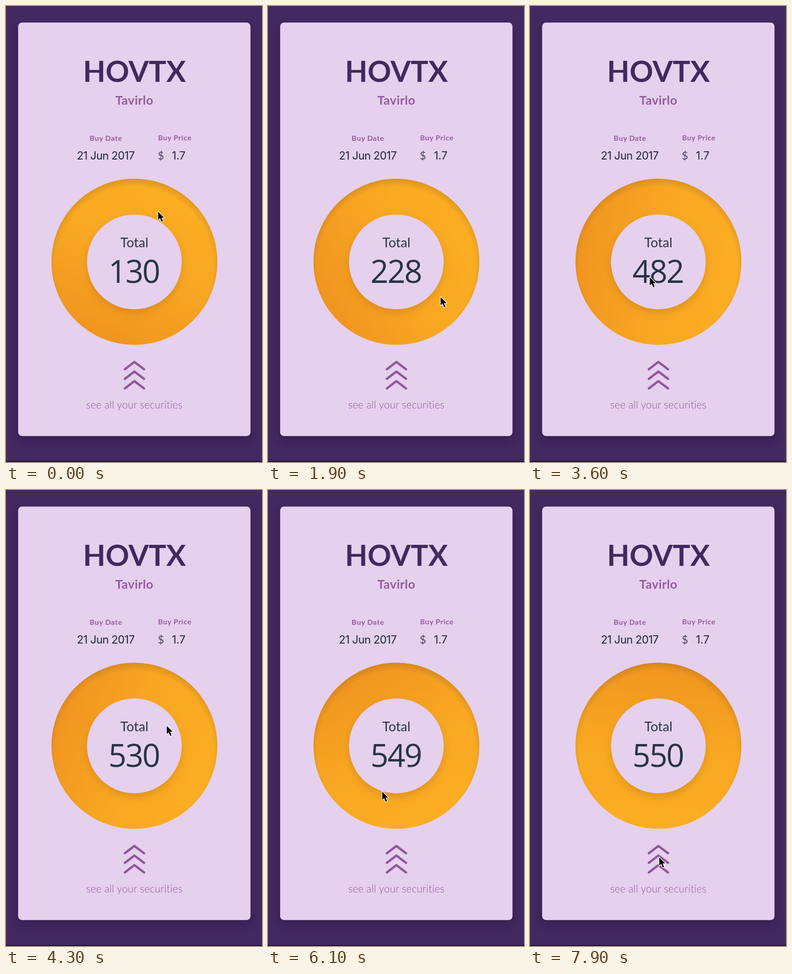
Recreate the animation shown at these times as an HTML page. Size 561 px wide and 998 px high, loop 8 s.

```html
<!DOCTYPE html>
<html lang="en">
<head>
<meta charset="utf-8">
<title>Security card</title>
<style>
  html, body { margin: 0; width: 100%; height: 100%; overflow: hidden; background: #42295f; }
  svg { display: block; width: 100%; height: 100%; }
  text { font-family: Lato, sans-serif; fill: #263449; }
  .mid { text-anchor: middle; }
  .ticker { font-size: 64px; font-weight: 700; fill: #42295f; }
  .fund { font-size: 27px; font-weight: 700; letter-spacing: .5px; fill: #955a9e; }
  .label { font-size: 16px; font-weight: 700; letter-spacing: .7px; fill: #955a9e; }
  .value { font-family: Inter, sans-serif; font-size: 24px; fill: #1c2740; }
  .date { letter-spacing: -.6px; }
  .dollar { font-size: 24px; fill: #4b4765; }
  .caption { font-size: 29px; }
  .total { font-family: "Open Sans", sans-serif; font-size: 69px; font-weight: 400; letter-spacing: -2.3px; }
  .hint { font-size: 22.5px; font-weight: 300; letter-spacing: .2px; fill: #91569b; }
  .chevrons { fill: none; stroke: #91569b; stroke-width: 5; stroke-linecap: round; stroke-linejoin: round; }
</style>
</head>
<body>
<svg viewBox="0 0 561 998">
  <defs>
    <linearGradient id="amber" gradientUnits="userSpaceOnUse" x1="281" y1="378" x2="281" y2="742">
      <stop offset="0" stop-color="#f09520"/>
      <stop offset=".5" stop-color="#f8a722"/>
      <stop offset="1" stop-color="#fbad22"/>
    </linearGradient>
    <radialGradient id="rim" gradientUnits="userSpaceOnUse" cx="281" cy="569" r="192">
      <stop offset=".9" stop-color="#8a5a1c" stop-opacity="0"/>
      <stop offset="1" stop-color="#8a5a1c" stop-opacity=".28"/>
    </radialGradient>
    <filter id="soft" x="-20%" y="-20%" width="140%" height="140%"><feGaussianBlur stdDeviation="9"/></filter>
    <clipPath id="disc"><circle cx="281.4" cy="559.8" r="182"/></clipPath>
  </defs>

  <rect width="561" height="998" fill="#42295f"/>
  <rect x="27" y="46" width="508" height="905" rx="8" fill="#21103b" opacity=".4" filter="url(#soft)"/>
  <rect y="996" width="561" height="2" fill="#1d112b"/>
  <rect x="26.6" y="36.3" width="509.2" height="905" rx="8.5" fill="#e5d0ee"/>

  <text class="mid ticker" x="281.5" y="166">HOVTX</text>
  <text class="mid fund" x="281.3" y="216">Tavirlo</text>
  <text class="mid label" x="219" y="295">Buy Date</text>
  <text class="mid label" x="370" y="294">Buy Price</text>
  <text class="mid value date" x="218.5" y="335.5">21 Jun 2017</text>
  <text class="dollar" x="332.5" y="335.5">$</text>
  <text class="value" x="363.5" y="335.5">1.7</text>

  <g clip-path="url(#disc)">
    <circle cx="281.4" cy="559.8" r="182" fill="url(#amber)"/>
    <circle cx="281.4" cy="559.8" r="182" fill="url(#rim)"/>
    <circle cx="281.4" cy="568" r="102" fill="#8a4f16" opacity=".28" filter="url(#soft)"/>
  </g>
  <circle cx="281.3" cy="560" r="103.8" fill="#e5d0ee"/>
  <text class="mid caption" x="281.3" y="528">Total</text>
  <text class="total" id="total" x="224.5" y="606">130</text>

  <path class="chevrons" d="M260.5 795L281.3 779L302.5 795M260.5 816L281.3 800L302.5 816M260.5 837L281.3 821L302.5 837"/>
  <text class="mid hint" x="281.3" y="881">see all your securities</text>

  <g id="cursor" stroke-linejoin="round">
    <path d="M1.8 3.2V21L6 17.2L9.4 25.2L12.4 23.9L9.1 16.2H14.8Z" fill="#000" stroke="#fff" stroke-width="2.6" paint-order="stroke"/>
  </g>
</svg>
<script>
  const LOOP = 8000, STEP = 100;
  const times = [0, 1000, 1900, 3000, 4300, 6100, 7900];
  const totals = [130, 142, 228, 412, 530, 549, 550];
  const xs = [332, 425, 377, 190, 351, 249, 282];
  const ys = [448, 562, 635, 653, 514, 658, 802];

  // Monotone cubic through the key values: smooth, never overshooting.
  function curve(values) {
    const slopes = values.slice(1).map((v, i) => (v - values[i]) / (times[i + 1] - times[i]));
    const tangents = values.map((_, i) => {
      const a = slopes[i - 1] || 0, b = slopes[i] || 0;
      return a * b > 0 ? 2 * a * b / (a + b) : 0;
    });
    return t => {
      if (t >= times.at(-1)) return values.at(-1);
      const i = times.findIndex(k => k > t) - 1;
      const span = times[i + 1] - times[i], u = (t - times[i]) / span, w = 1 - u;
      return w * w * ((1 + 2 * u) * values[i] + u * span * tangents[i])
           + u * u * ((1 + 2 * w) * values[i + 1] - w * span * tangents[i + 1]);
    };
  }

  const totalAt = curve(totals), xAt = curve(xs), yAt = curve(ys);
  const amber = document.getElementById("amber");
  const total = document.getElementById("total");
  const cursor = document.getElementById("cursor");

  function draw(now) {
    const t = Math.floor(now % LOOP / STEP) * STEP;
    amber.setAttribute("gradientTransform", `rotate(${205 + t * 0.0203} 281.4 559.8)`);
    total.textContent = Math.round(totalAt(t));
    cursor.setAttribute("transform", `translate(${xAt(t) - .5} ${yAt(t) - 1})`);
  }

  const start = performance.now();
  function frame() {
    draw(performance.now() - start);
    requestAnimationFrame(frame);
  }
  frame();
</script>
</body>
</html>
```
